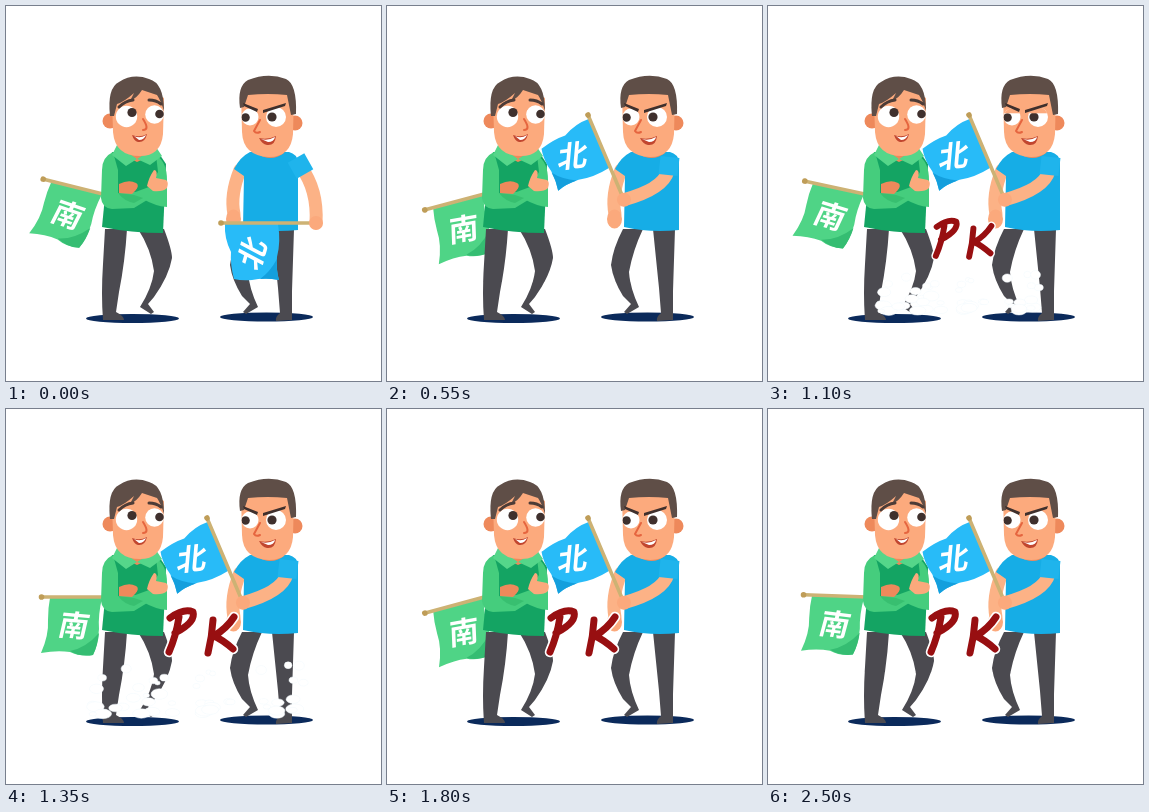
An HTML page that plays this animation: 375 px wide and 375 px high, repeating every 2.55 s.

```html
<!DOCTYPE html>
<html lang="zh">
<head>
<meta charset="utf-8">
<title>南北 PK</title>
<style>
  html, body { margin: 0; width: 100%; height: 100%; overflow: hidden; background: #fff; }
  svg { display: block; width: 100vw; height: 100vh; }
  .shadow { fill: #0b2a5b; }
  .trousers { fill: #4b4a50; }
  .face { fill: #fcaa7d; }
  .neck { fill: #ee895b; }
  .hand { fill: #fba97c; }
  .hair { fill: #5f4e47; }
  .dark { fill: #3f302d; }
  .vest { fill: #14a463; }
  .sleeve { fill: #45cd7d; }
  .fold { fill: #38bf70; }
  .collar { fill: #55d68a; }
  .shirt { fill: #16ade6; }
  .white { fill: #fff; }
  .limb, .line { fill: none; stroke-linecap: round; stroke-linejoin: round; }
  .limb { stroke: #fcb286; stroke-width: 13; }
  .cuff { stroke: #1fb4ec; stroke-width: 19; stroke-linecap: butt; }
  .pole { stroke: #cdb274; stroke-width: 3.6; stroke-linecap: round; }
  .knob { fill: #bf9d58; }
  .brow { stroke: #4d3c37; stroke-width: 3; }
  .nose { stroke: #e5653f; stroke-width: 2; }
  .glyph { fill: #fff; font: 700 30px "Noto Sans CJK SC", "Noto Sans CJK", sans-serif; text-anchor: middle; }
  .edge { stroke: #fff; stroke-width: 10.5; }
  .ink { stroke: #980f11; stroke-width: 7; }
  .smoke { fill: #fff; stroke: #f1f8fc; stroke-width: .5; }
</style>
</head>
<body>
<svg viewBox="0 0 375 375">
  <defs>
    <clipPath id="eyes"><circle cx="244" cy="111" r="8.5"/><circle cx="270" cy="111" r="10"/></clipPath>
    <g id="letters">
      <path d="M173 208Q170 227 163 243M164 209Q178 199 187 203Q190 213 169 224"/>
      <path d="M207 211Q206 228 202 244M228 208Q221 219 208 227Q217 231 227 240"/>
    </g>
  </defs>

  <ellipse class="shadow" cx="126.5" cy="312.5" rx="46.5" ry="4.6"/>
  <ellipse class="shadow" cx="260.5" cy="311" rx="46.5" ry="4.6"/>

  <!-- left flag -->
  <g id="south">
    <path d="M44 189L96 189Q92 206 93 220Q92 236 87 246Q74 248 64 243Q51 241 35 244Q43 226 42 211Q42 199 44 189Z" fill="#4fd486"/>
    <path d="M93 224Q92 236 87 246Q74 248 64 242Q80 239 93 224Z" fill="#35bd72"/>
    <path class="pole" d="M36 188H99"/>
    <circle class="knob" cx="35.5" cy="188" r="2.8"/>
    <text class="glyph" y="10.5" transform="translate(68 217) rotate(5) skewX(-8)">南</text>
  </g>

  <!-- left man -->
  <g>
    <g class="trousers">
      <path d="M99 223H121Q119 256 113 286L110 306Q118 310 118 314H97Q95 288 97 258Z"/>
      <path d="M132 223H158Q166 244 166 252Q163 270 148 291L142 298L148 306L145 308L134 301Q146 282 148 265Q145 243 132 223Z"/>
    </g>
    <path class="vest" d="M106 146L152 146L160 158L157 227Q125 227 96 221L100 180Z"/>
    <path class="sleeve" d="M107 146Q96 151 96 164L95 192Q96 202 106 203L128 202L146 191L130 186L112 187L112 164Z"/>
    <path class="sleeve" d="M150 149Q161 156 161 174L161 201Q149 200 137 193L124 188L143 181L152 166Z"/>
    <path class="fold" d="M112 187L128 189L137 192L128 197Q118 195 112 187Z"/>
    <path class="neck" d="M113 178Q123 173 130 177Q135 180 126 188L113 187Z"/>
    <path class="hand" d="M141 180Q143 171 148 164Q152 164 150 172L160 174Q163 176 161 182Q157 186 147 185Z"/>
    <path class="neck" d="M117 136H147L144 150L131 156L119 150Z"/>
    <path class="collar" d="M111 139L131 153L120 160L106 149ZM131 153L150 141L156 150L144 159Z"/>
    <circle class="neck" cx="104" cy="115" r="7.5"/>
    <path class="face" d="M106 94Q132 74 158 92L157 128Q155 150 134 150Q109 150 107 126Z"/>
    <path class="hair" d="M104 110Q101 82 113 76Q127 67 143 73Q158 77 158 105Q155 95 151 89L136 84Q131 92 124 95L128 87Q118 96 111 98L108 110Z"/>
    <circle class="white" cx="120.500" cy="110.500" r="10.700"/>
    <circle class="white" cx="148.500" cy="108.500" r="9.300"/>
    <circle class="dark" cx="126" cy="106.500" r="4.600"/>
    <circle class="dark" cx="153.500" cy="108" r="4.300"/>
    <path class="line brow" d="M113 101Q119 95 127 94M143 94Q150 94 155 98"/>
    <path class="line nose" d="M137 113Q144 124 137 124"/>
    <path d="M126 129Q134 132 141 128Q139 137 132 136Q128 135 126 129Z" fill="#c1462f"/>
    <path class="white" d="M128 130Q134 133 140 129Q138 134 133 134Z"/>
  </g>

  <!-- right man -->
  <g>
    <g class="trousers">
      <path d="M266 223H288L286 285V314L270 315Q269 311 274 307L272 282Z"/>
      <path d="M256 223H236Q226 242 224 259Q226 274 236 290L244 298L237 306L240 308L252 301Q243 282 242 266Q246 244 256 223Z"/>
    </g>
    <path class="limb" d="M234 164Q224 189 228 208"/>
    <ellipse class="hand" cx="227.500" cy="213" rx="7.500" ry="9.500"/>
    <path class="shirt" d="M244 146Q234 151 228 163L238 170L237 221Q263 227 292 224V156Q291 148 283 146Z"/>
    <path class="neck" d="M248 137H279L278 147Q265 157 250 147Z"/>
    <circle class="neck" cx="289" cy="117" r="7.500"/>
    <path class="face" d="M235 86H288L287 128Q285 151 263 151Q237 150 236 126Z"/>
    <path class="hair" d="M234 102Q231 80 242 74Q262 66 280 73Q291 78 290 108L285 109L281 89Q262 87 242 89L238 101Z"/>
    <g clip-path="url(#eyes)">
      <path class="white" d="M230 100H284V126H230Z"/>
      <circle class="dark" cx="239.500" cy="111.500" r="4.300"/>
      <circle class="dark" cx="266" cy="111" r="4.600"/>
      <path class="face" d="M230 98V97L252 105L256 106L284 97V90H230Z"/>
      <rect id="lid" class="face" x="230" y="70" width="54" height="30"/>
    </g>
    <path class="dark" d="M237 97L252 103L251 106L238 100ZM257 104L280 97L279 100L257 107Z"/>
    <path class="line nose" d="M254 114L248 125Q250 128 254 126"/>
    <path d="M253 132Q262 134 270 130Q269 140 261 139Q256 138 253 132Z" fill="#c1462f"/>
    <path class="white" d="M255 133Q262 135 269 131Q268 136 262 136Z"/>
  </g>

  <!-- right flag, drawn along its pole from the tip -->
  <g id="north">
    <path d="M4 1H57Q60 19 56 34Q55 47 58 57Q43 54 31 57Q21 58 13 56Q9 41 10 29Q3 15 4 1Z" fill="#28bbf8"/>
    <path d="M56 36Q55 47 58 57Q48 55 39 56Q49 49 56 36Z" fill="#149fdd"/>
    <path class="pole" d="M0 0H92"/>
    <circle class="knob" r="2.800"/>
    <text class="glyph" y="10.500" transform="translate(32 30) rotate(-74) skewX(-12)">北</text>
  </g>
  <path id="arm" class="limb"/>
  <path id="cuff" class="line cuff"/>
  <circle id="fist" class="hand" r="7"/>

  <g id="smoke"></g>
  <g id="pk" role="img" aria-label="PK">
    <use href="#letters" class="line edge"/>
    <use href="#letters" class="line ink"/>
  </g>
</svg>
<script>
const LOOP = 2550, STEP = 50;
const $ = id => document.getElementById(id);
const set = (id, name, value) => $(id).setAttribute(name, value);
const clamp = v => Math.max(0, Math.min(1, v));
const ease = v => (1 - Math.cos(Math.PI * clamp(v))) / 2;

// Smooth curve through [time, value] keys; flat at turning points.
function curve(keys, t) {
  const last = keys.length - 1;
  if (t >= keys[last][0]) return keys[last][1];
  const rise = k => (keys[k + 1][1] - keys[k][1]) / (keys[k + 1][0] - keys[k][0]);
  const slope = k => {
    if (k < 1 || k >= last) return 0;
    const a = rise(k - 1), b = rise(k);
    return a * b > 0 ? 2 * a * b / (a + b) : 0;
  };
  const i = keys.findIndex((k, n) => n < last && t < keys[n + 1][0]);
  const [t0, v0] = keys[i], [t1, v1] = keys[i + 1];
  const d = t1 - t0, u = (t - t0) / d;
  return v0 + (v1 - v0) * u * u * (3 - 2 * u)
    + d * u * (1 - u) * (slope(i) * (1 - u) - slope(i + 1) * u);
}

// Short upward flick, long droop.
function swing(t) {
  const a = 2 * Math.PI * (t + 6) / 1168;
  return 14.5 * Math.cos(a) + 5 * Math.cos(2 * a) - 5.5;
}

// Lids close for 350 ms every 1250 ms.
function blink(t) {
  const away = Math.abs((t + 900) % 1250 - 625);
  return ease((175 - away) / 110);
}

const turn = [[0, 0], [250, 59], [400, 67]];
const tipX = [[0, 215], [250, 195], [400, 201]];
const tipY = [[0, 217], [250, 125], [400, 109]];

function drawArm(t) {
  const deg = curve(turn, t), a = deg * Math.PI / 180, k = deg / 67;
  const x = curve(tipX, t), y = curve(tipY, t);
  const hx = x + 92 * Math.cos(a) + 3 * (1 - k), hy = y + 92 * Math.sin(a);
  const sx = 295 - 14 * k, sy = 161 + 4 * k;
  const ex = 312 - 36 * k, ey = 184 - k;
  set('north', 'transform', `translate(${x} ${y}) rotate(${deg})`);
  set('arm', 'd', `M${sx} ${sy}Q${ex} ${ey} ${hx} ${hy}`);
  set('cuff', 'd', `M${290 - 7 * k} ${152 - k}L${299 - 18 * k} ${168 + k}`);
  set('fist', 'cx', hx);
  set('fist', 'cy', hy);
}

let seed = 11;
const random = () => (seed = seed * 16807 % 2147483647) / 2147483647;
const puffs = Array.from({ length: 46 }, () => {
  const el = document.createElementNS('http://www.w3.org/2000/svg', 'ellipse');
  el.setAttribute('class', 'smoke');
  $('smoke').append(el);
  return { el, side: 2 * random() - 1, lift: random() ** 2, size: 2.5 + 4.5 * random() };
});

function drawSmoke(t) {
  const s = (t - 800) / 900;
  const on = s > 0 && s < 1;
  $('smoke').style.display = on ? '' : 'none';
  if (!on) return;
  const reach = 1 - (1 - s) ** 3, grow = Math.sin(Math.PI * s) ** .7;
  for (const p of puffs) {
    const r = p.size * grow;
    p.el.setAttribute('cx', 192 + 112 * p.side * reach);
    p.el.setAttribute('cy', 305 - 52 * p.lift * reach);
    p.el.setAttribute('rx', r * (1.5 - .6 * p.lift));
    p.el.setAttribute('ry', r * .8);
  }
}

function draw(t) {
  set('south', 'transform', `rotate(${swing(t)} 97 187.5)`);
  set('lid', 'y', 70 + 17 * blink(t));
  drawArm(t);
  drawSmoke(t);
  const k = ease((t - 950) / 200);
  $('pk').style.display = k > 0 ? '' : 'none';
  set('pk', 'transform', `translate(196 ${290 - 66 * k}) scale(${k}) translate(-196 -224)`);
}

function tick(now) {
  draw(Math.floor(now % LOOP / STEP) * STEP);
  requestAnimationFrame(tick);
}
draw(0);
requestAnimationFrame(tick);
</script>
</body>
</html>
```
